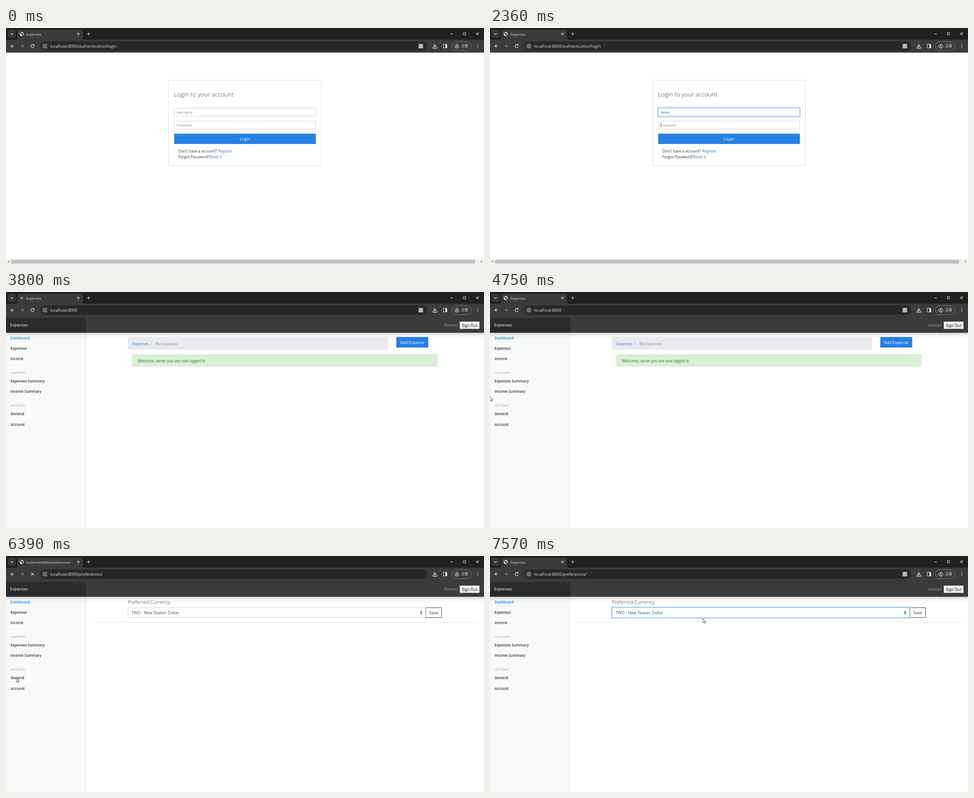
Animation, 1063 px wide and 527 px high, one loop 8 s. Source, as an HTML page:

```html
<!DOCTYPE html>
<html lang="en">
<head>
<meta charset="utf-8">
<title>Expenses</title>
<style>
  html, body { margin: 0; width: 100%; height: 100%; overflow: hidden; background: #fff; }
  svg { display: block; width: 1063px; height: 527px; font-family: "Open Sans", "Noto Sans CJK TC", "Noto Sans CJK", sans-serif; }
  text { white-space: pre; }
</style>
</head>
<body>
<svg id="stage" viewBox="0 0 1063 527">
  <defs>
    <linearGradient id="shade" x1="0" y1="0" x2="0" y2="1">
      <stop offset="0" stop-color="#000" stop-opacity=".17"/>
      <stop offset=".4" stop-color="#000" stop-opacity=".06"/>
      <stop offset="1" stop-color="#000" stop-opacity="0"/>
    </linearGradient>
    <linearGradient id="brand" x1="0" y1="0" x2="0" y2="1">
      <stop offset="0" stop-color="#2c2d2e"/>
      <stop offset=".88" stop-color="#28292b"/>
      <stop offset="1" stop-color="#323335"/>
    </linearGradient>
  </defs>
  <g id="page"></g>
  <g id="browser"></g>
  <g id="pointer"></g>
</svg>
<script>
const LOOP = 8000;
const USER = 'tamer';
const BLUE = '#2780e3', LINK = '#3c7fd0', INK = '#373a3c', LIGHT = '#dedede';
const HOME = 3800, PREFS = 6390, PREFS_READY = 6470;

const rect = (x, y, w, h, fill, more = '') =>
  `<rect x="${x}" y="${y}" width="${w}" height="${h}" fill="${fill}" ${more}/>`;
const text = (x, y, size, fill, str, more = '') =>
  `<text x="${x}" y="${y}" font-size="${size}" fill="${fill}" ${more}>${str}</text>`;
const circle = (x, y, r, fill, more = '') =>
  `<circle cx="${x}" cy="${y}" r="${r}" fill="${fill}" ${more}/>`;
const stroke = (d, color = LIGHT, width = 1.1) =>
  `<path d="${d}" fill="none" stroke="${color}" stroke-width="${width}"/>`;
const cross = (x, y, r) => stroke(`M${x - r} ${y - r}l${2 * r} ${2 * r}m0 ${-2 * r}l${-2 * r} ${2 * r}`);
const between = (t, a, b) => t >= a && t < b;
// How many of the given moments have passed
const passed = (t, times) => times.filter(time => t >= time).length;

function globe(r) {
  return `<g transform="translate(35 13.5) scale(${r / 4.5})">` +
    circle(0, 0, 4.1, '#555', `stroke="${LIGHT}" stroke-width=".9"`) +
    `<path d="M-4 -1Q-2 -1 -1 1T1 3L0 4Q-4 4 -4 -1M-1 -4Q0 -1 2 -1T4 1Q4 -4 -1 -4" fill="${LIGHT}"/></g>`;
}

function tabIcon(t) {
  if (between(t, 3400, HOME)) {
    const turn = (t - 3640) * .4;
    return `<g transform="rotate(${turn} 35 13.5)">${stroke('M31 13A4.2 4.2 0 0 1 35 9.3', '#8a8a8a', .8)}</g>`;
  }
  return globe(between(t, HOME, 3880) ? 2.5 : 4.5);
}

function browser(t) {
  const loading = between(t, 3400, HOME) || between(t, PREFS, PREFS_READY);
  const path = t < HOME ? '/authentication/login' : t < PREFS ? '' : '/preferences/';
  const url = 'localhost:8000' + path;
  const untitled = between(t, PREFS, PREFS_READY);
  return rect(0, 0, 1063, 26, '#1f2020') + rect(0, 26, 1063, 29, '#3b3b3b') +
    rect(4, 4, 17.5, 18, '#383939', 'rx="5"') + stroke('M10.3 12l2.5 2.5l2.5 -2.5') +
    '<path d="M21 26Q25 26 25 22V9Q25 4 30 4H166Q171 4 171 9V22Q171 26 175 26Z" fill="#3b3b3b"/>' +
    tabIcon(t) +
    text(45, 16.5, 7.6, '#e6e6e6', untitled ? url : 'Expenses') +
    cross(161, 13.3, 2.3) + stroke('M180 13.3h7m-3.5 -3.5v7') +
    stroke('M988 13.3h6') + stroke('M1017.5 10.5h4.5v5h-5v-5z') + cross(1048.5, 13, 2.8) +
    stroke('M18 40.5h-7m3.5 -3.5l-3.5 3.5l3.5 3.5', LIGHT, 1.2) +
    stroke('M32 40.5h7m-3.5 -3.5l3.5 3.5l-3.5 3.5', '#858585', 1.2) +
    (loading ? cross(59, 40.5, 3) :
      stroke('M62 38.5A3.5 3.5 0 1 0 62.4 41.5M62.5 36.5v2.5h-2.7', LIGHT, 1.2)) +
    rect(76, 30, 861, 21, '#282828', 'rx="10.5"') + circle(86.5, 40.5, 8, '#3b3b3b') +
    circle(86.3, 40.4, 3.8, 'none', `stroke="${LIGHT}"`) + stroke('M86.3 39.8v2.6m0 -4.4v1') +
    text(98.5, 43.5, 8.95, '#e3e3e3', url) +
    (untitled ? '' : rect(917.5, 35.5, 10, 10, '#b9bbbd')) +
    stroke('M953.5 35.5v6.5m-3 -3l3 3l3 -3M949.3 42.5v2.5h8.5v-2.5', '#d7e5f5', 1.4) +
    stroke('M972.5 36.5h8v8h-8z') + rect(977, 36.5, 3.5, 8, LIGHT) +
    rect(990.5, 30.5, 44.5, 20, 'none', 'rx="10" stroke="#777"') +
    circle(1002.5, 40.5, 4.6, 'none', `stroke="${LIGHT}"`) + circle(1002.5, 39.2, 1.5, LIGHT) +
    stroke('M999.3 43.6q3.2 -2.6 6.4 0') +
    text(1013, 43.4, 7.5, LIGHT, '訪客') +
    [37, 40.5, 44].map(y => circle(1049, y, .9, LIGHT)).join('');
}

function field(x, y, w, h, glow) {
  return (glow ? rect(x - 1, y - 1, w + 2, h + 2, 'none', `stroke="#bed9f7" stroke-width="2.4" opacity="${glow}"`) : '') +
    rect(x + .5, y + .5, w - 1, h - 1, '#fff', `stroke="${glow ? '#93c0f1' : '#d3d6d9'}"`);
}

function login(t) {
  const letters = passed(t, [1630, 1710, 1870, 1940, 2110]);
  const dots = [0, 1, 3, 4, 5][passed(t, [2580, 2760, 2910, 3070])];
  const caret = (x, y) => stroke(`M${x} ${y}v10.5`, '#444', .8);
  const nameGlow = between(t, 1170, 1220) ? .5 : +between(t, 1220, 2430);
  let caretMark = '';
  if (between(t, 1170, 2360)) caretMark = caret([380, 383, 387, 394, 398, 401.5][letters], 183);
  if (between(t, 2360, 3560)) caretMark = caret(380 + dots * 3.5, 211.5);
  let secret = '';
  for (let i = 0; i < dots; i++) secret += circle(381.2 + i * 3.5, 217.2, 1.2, '#444');

  return rect(0, 55, 1063, 472, '#fff') +
    rect(361.5, 116.5, 340, 190.5, '#fff', 'stroke="#dfdfdf"') +
    text(373.5, 153, 13.6, INK, 'Login to your account', 'font-weight="300"') +
    field(374, 178.5, 315, 19, nameGlow) + field(374, 207.5, 315, 18.5, +(t >= 2430)) +
    (letters ? text(379.5, 191, 7.6, '#495057', USER.slice(0, letters)) : text(379.5, 191, 7.5, '#868e96', 'username')) +
    (dots ? secret : text(379.5, 219.8, 7.5, '#868e96', 'Password')) + caretMark +
    rect(374, 236, 315, 23, BLUE) + text(531.5, 251, 9.2, '#fff', 'Login', 'text-anchor="middle"') +
    text(383.3, 278, 8.4, INK, "Don't have a account?") + text(471.8, 278, 8.4, LINK, 'Register') +
    text(383.3, 291.2, 8.4, INK, 'Forgot Password?') + text(452, 291.2, 8.4, LINK, 'Reset it') +
    rect(0, 516.5, 1063, 10.5, '#f1f1f1') + rect(11, 517.5, 1032, 8.5, '#c1c1c1') +
    '<path d="M4 521.5l2.5 -2.3v4.6zM1059 521.5l-2.5 -2.3v4.6z" fill="#505050"/>';
}

function frame() {
  const items = [['Dashboard', 105.7], ['Expenses', 129], ['Income', 152.2],
    ['Expenses Summary', 202], ['Income Summary', 225.2], ['General', 275.4], ['Account', 298.7]];
  return rect(0, 55, 1063, 472, '#fff') + rect(0, 91, 177, 436, '#f8faf9') + rect(177, 91, 1, 436, '#e3e5e5') +
    rect(0, 91, 1063, 13, 'url(#shade)') +
    rect(0, 55, 1063, 36, '#3a3b3c') + rect(0, 58, 178, 33, 'url(#brand)') +
    text(9.5, 77.4, 9, '#fff', 'Expenses', 'font-weight="500"') +
    text(1004, 77, 8.5, '#a5a6a7', `(${USER})`, 'text-anchor="end"') +
    rect(1009.5, 66.5, 43, 15.5, '#efefef', 'stroke="#d8d8d8"') +
    text(1031, 77.5, 8.7, '#111', 'Sign Out', 'text-anchor="middle"') +
    items.map(([name, y], i) => text(10, y, 8.1, i ? '#333' : BLUE, name, 'font-weight="600"')).join('') +
    text(10, 183, 7.4, '#777c80', 'SUMMARY', 'font-weight="300"') +
    text(10, 256, 7.5, '#777c80', 'SETTINGS', 'font-weight="300"');
}

function dashboard() {
  return rect(271, 100.5, 578, 28.5, '#e8eaee') +
    text(281, 118.5, 8.2, LINK, 'Expenses') + text(321.5, 118.5, 8.2, '#868e96', '/') +
    text(332.5, 118.5, 8.2, '#868e96', 'My Expenses') +
    rect(868, 100.5, 71, 23.5, BLUE) +
    text(903.5, 115.8, 8.95, '#fff', 'Add Expense', 'text-anchor="middle"') +
    rect(280.5, 139, 679, 28, '#d8f0d3') +
    text(293, 156.8, 8.3, '#3a6b35', `Welcome, ${USER} you are now logged in`);
}

function preferences(t) {
  return text(271, 107, 11.05, INK, 'Preferred Currency', 'font-weight="300"') +
    rect(933.5, 115.5, 35, 22, '#fff', `stroke="${INK}"`) +
    text(951, 130.2, 9, INK, 'Save', 'text-anchor="middle"') +
    field(271, 115, 662.5, 23, +(t >= 7250)) +
    text(279, 130.2, 9.1, '#495057', 'TWD - New Taiwan Dollar') +
    '<path d="M920.8 125.7l2.5 -2.9l2.5 2.9zM920.8 127.3l2.5 2.9l2.5 -2.9z" fill="#343a40"/>' +
    rect(192.5, 147.5, 856.5, 1, '#e6e6e6');
}

// Pointer waypoints: time, x, y
const TO_FORM = [[160, 103, 40], [400, 240, 434], [720, 460, 199], [1170, 460, 199]];
const TO_MENU = [[4280, 464, 192], [4510, 0, 230], [4690, 0, 233], [4900, 44, 240], [5240, 19, 270],
  [5400, 23, 272], [6470, 23, 272], [7170, 473, 127], [7410, 473, 127], [7570, 473.5, 139.5], [LOOP, 473.5, 139.5]];

// The pointer is refreshed every 80 ms
function locate(t, route) {
  const i = route.findIndex(([start], k) => k + 1 < route.length && between(t, start, route[k + 1][0]));
  if (i < 0) return null;
  const [t0, x0, y0] = route[i], [t1, x1, y1] = route[i + 1];
  const k = Math.floor((t - t0) / 80) * 80 / (t1 - t0);
  return [x0 + (x1 - x0) * k, y0 + (y1 - y0) * k];
}

const ARROW = 'M0 0V9.6L2.2 7.6L3.8 11.2L5.3 10.5L3.7 7.1H6.6Z';
const HAND = 'M-1 1Q-1 0 0 0T1 1V4.6Q2 4 3 5Q4 4.5 4.8 5.5Q6.5 5 6.5 7V10Q6 11.5 5.4 12.8H-.5Q-1.5 11 -3.6 8.5Q-3.8 7 -2.4 7.2L-1 8.4Z';

function pointer(t) {
  const spot = locate(t, TO_FORM) || locate(t, TO_MENU);
  if (!spot) return '';
  const shape = between(t, 5240, PREFS) ? HAND : ARROW;
  return `<path transform="translate(${spot})" d="${shape}" fill="#fff" stroke="#333" stroke-width=".8"/>`;
}

const shown = {};
function update(id, markup) {
  if (shown[id] !== markup) document.getElementById(id).innerHTML = shown[id] = markup;
}

function draw() {
  const t = performance.now() % LOOP;
  update('page', t < HOME ? login(t) : frame() + (t < PREFS ? dashboard() : preferences(t)));
  update('browser', browser(t));
  update('pointer', pointer(t));
  requestAnimationFrame(draw);
}
draw();
</script>
</body>
</html>
```
